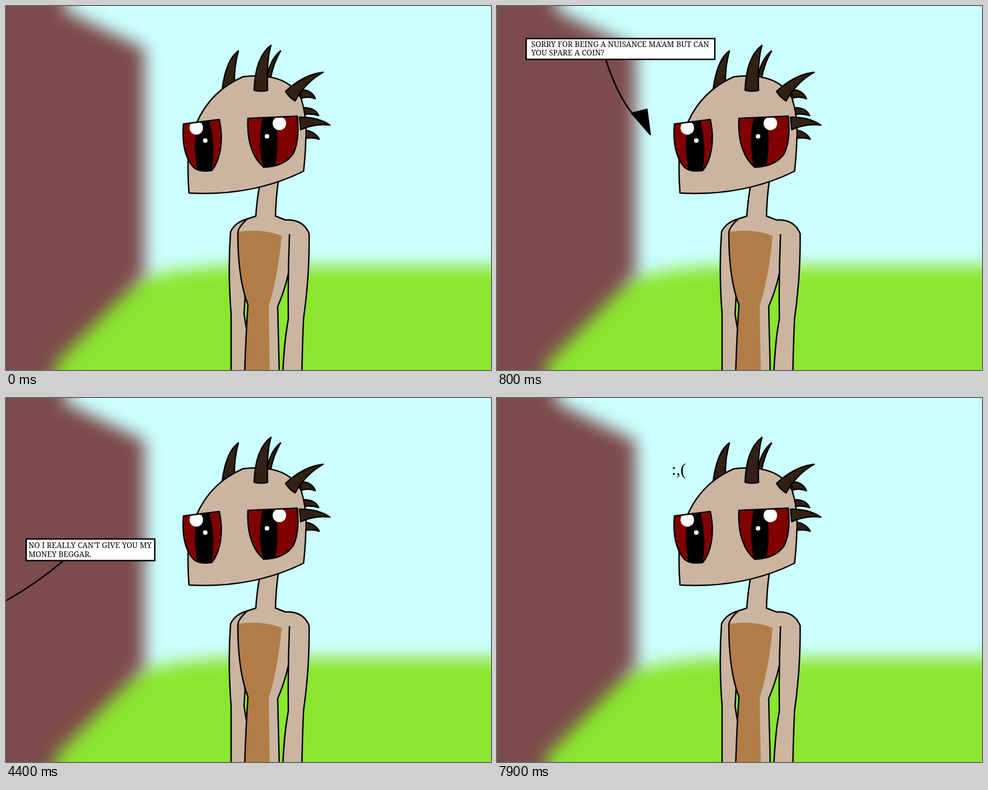
Animation, 864 px wide and 648 px high, one loop 8 s. Source, as an HTML page:

```html
<!DOCTYPE html>
<html lang="en">
<head>
<meta charset="utf-8">
<title>Spare a coin</title>
<style>
  html, body { margin: 0; width: 100%; height: 100%; overflow: hidden; background: #cff; }
  svg { display: block; width: 100vw; height: 100vh; }
  .ink { stroke: #000; stroke-width: 2.5; stroke-linejoin: round; stroke-linecap: round; }
  .line { fill: none; }
  .skin { fill: #cbb5a0; }
  .horn { fill: #332015; }
  .box { fill: #fff; stroke-linejoin: miter; }
  .talk { font: 500 13.6px "Noto Serif", serif; }
  .sad { font: 30px "Liberation Serif", serif; }
  .cue { visibility: hidden; }
</style>
</head>
<body>
<svg viewBox="0 0 864 648">
  <defs>
    <filter id="soft" filterUnits="userSpaceOnUse" x="-150" y="-150" width="1164" height="948" color-interpolation-filters="sRGB">
      <feGaussianBlur stdDeviation="15"/>
    </filter>
    <clipPath id="eyeL"><path id="lidL" d="M316 210L380 202Q386 230 382 255Q377 282 366 293Q345 296 335 288Q312 265 316 210Z"/></clipPath>
    <clipPath id="eyeR"><path id="lidR" d="M431 200L519 196Q523 240 512 262Q497 286 459 287Q428 260 431 200Z"/></clipPath>
  </defs>

  <rect width="864" height="648" fill="#cff"/>
  <path filter="url(#soft)" fill="#8be62f" d="M-100 800V520L215 490Q320 463 420 462H980V800Z"/>
  <path filter="url(#soft)" fill="#7c4b4b" d="M-120-120H105V8L247 76V478L90 636L65 780H-120Z"/>

  <!-- far arm, torso, near arm -->
  <path class="skin" d="M430 379Q408 385 400 402Q395 470 401 549V660H425L428 573L424 548L426 512L440 400Z"/>
  <path class="ink line" d="M430 379Q408 385 400 402Q395 470 401 549V660M426 514Q425 535 424 548L428 573"/>
  <path class="skin" d="M452 316L445 374L430 379Q413 394 413 405Q413 485 431 532Q427 590 425 660H487L484 535Q497 505 503 476L510 390L498 382L480 374L485 310Z"/>
  <path class="skin" d="M498 381Q529 379 540 405Q541 480 530 557Q528 600 527 660H493Q495 600 503 557V476L498 420Z"/>
  <path fill="#b27c46" d="M414 402Q458 396 491 409Q485 480 468 534L470 660H425Q427 590 431 532Q413 485 414 402Z"/>
  <path class="ink line" d="M452 318Q447 345 445 374L430 379Q413 394 413 405Q413 485 431 532Q427 590 425 660M485 312Q481 340 480 374L498 381Q529 379 540 405Q541 480 530 557Q528 600 527 660M505 407Q502 480 503 557Q495 600 493 660M503 476Q497 505 484 535L487 660"/>

  <!-- head -->
  <g class="ink horn">
    <path d="M385 149Q392 95 414 80Q406 108 407 140Z"/>
    <path d="M464 130Q470 95 489 80Q476 102 471 130Z"/>
    <path d="M524 149Q545 149 551 165Q540 160 526 164Z"/>
    <path d="M528 181Q550 180 557 195Q545 191 530 193Z"/>
    <path d="M532 221Q550 223 558 237Q545 233 532 236Z"/>
  </g>
  <path class="ink skin" d="M422 126Q501 117 526 165Q537 202 534 240Q533 270 530 294Q440 339 326 333Q323 295 325 260L340 207Q365 151 422 126Z"/>
  <g class="ink horn">
    <path d="M442 150Q444 91 472 70Q464 95 466 150Q455 153 442 150Z"/>
    <path d="M498 152Q530 122 565 118Q534 135 515 169Q505 163 498 152Z"/>
    <path d="M523 198Q555 197 577 212Q550 209 525 220Z"/>
  </g>
  <g clip-path="url(#eyeL)">
    <use href="#lidL" fill="maroon"/>
    <path d="M342 204L361 200Q375 250 366 296H342Q331 250 342 204Z"/>
    <circle cx="339" cy="217" r="12" fill="#fff"/>
    <circle cx="355" cy="239.500" r="4" fill="#fff"/>
  </g>
  <g clip-path="url(#eyeR)">
    <use href="#lidR" fill="maroon"/>
    <path d="M458 196H480Q488 245 479 290H459Q446 245 458 196Z"/>
    <circle cx="487" cy="209" r="12" fill="#fff"/>
    <circle cx="465" cy="232" r="4" fill="#fff"/>
  </g>
  <use href="#lidL" class="ink line"/>
  <use href="#lidR" class="ink line"/>

  <g class="cue" data-from="800" data-to="4400">
    <path class="ink line" d="M194 96Q215 160 241 191"/>
    <path class="ink" stroke-width="1" d="M240 191L267 184L273 229Z"/>
    <rect class="ink box" x="52" y="58" width="336" height="37"/>
    <text class="talk" x="61" y="73">SORRY FOR BEING A NUISANCE MA'AM BUT CAN</text>
    <text class="talk" x="61" y="88">YOU SPARE A COIN?</text>
  </g>
  <g class="cue" data-from="4400" data-to="7900">
    <path class="ink line" d="M102 290Q52 332 -2 362"/>
    <rect class="ink box" x="36" y="251" width="229" height="38.500"/>
    <text class="talk" x="40" y="267">NO I REALLY CAN'T GIVE YOU MY</text>
    <text class="talk" x="40" y="283">MONEY BEGGAR.</text>
  </g>
  <g class="cue" data-from="7900" data-to="8000">
    <text class="sad" x="311" y="137">:,(</text>
  </g>
</svg>
<script>
  const LOOP = 8000;
  for (const cue of document.querySelectorAll(".cue")) {
    const { from, to } = cue.dataset;
    const step = (time, visibility) => ({ offset: time / LOOP, visibility, easing: "step-end" });
    const frames = [step(0, "hidden"), step(from, "visible"), step(to, "hidden")];
    if (to < LOOP) frames.push(step(LOOP, "hidden"));
    cue.animate(frames, { duration: LOOP, iterations: Infinity });
  }
</script>
</body>
</html>
```
